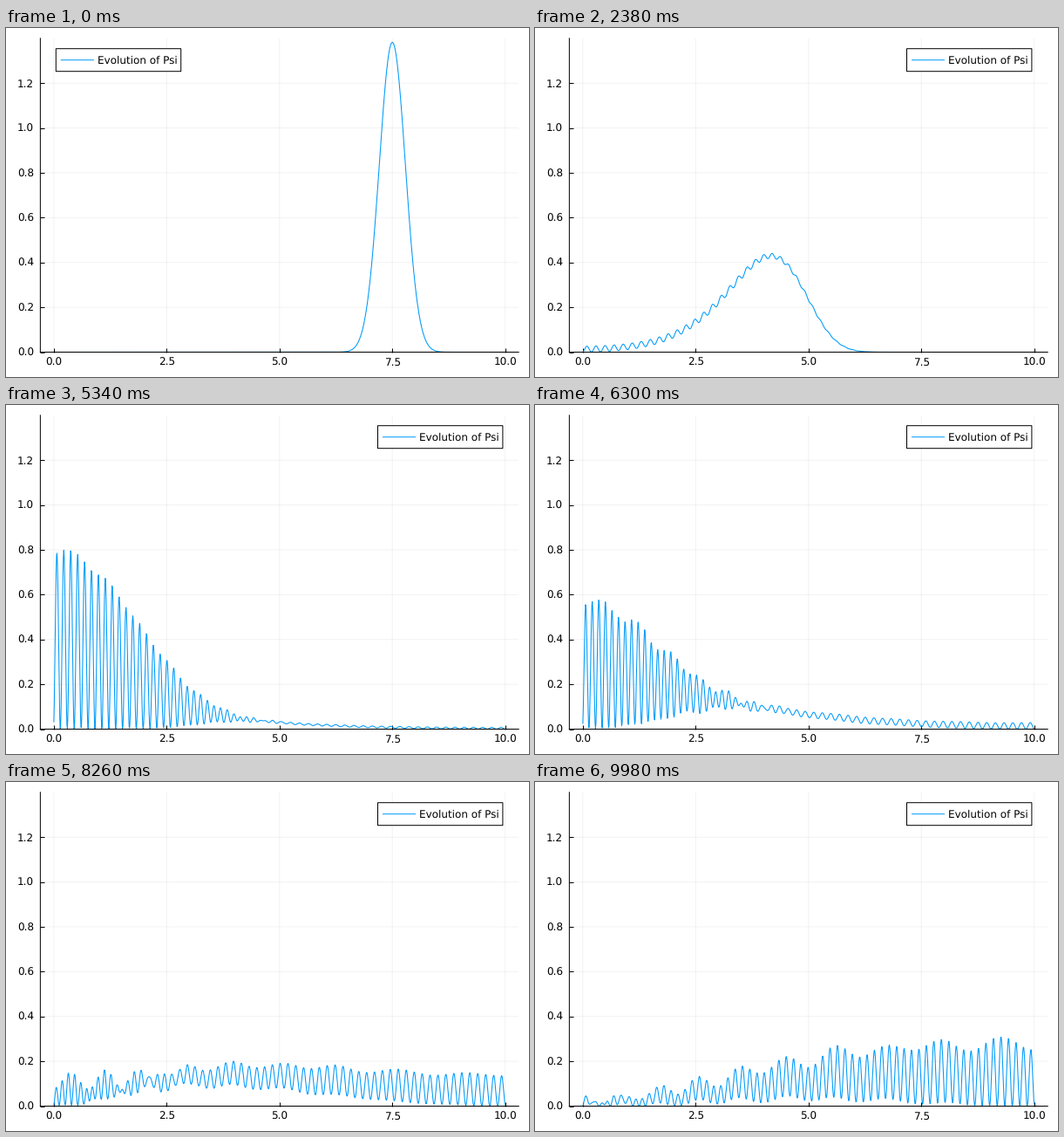
Write a matplotlib script that moves like this. It is 600 px wide and 400 px high and loops after 10 s.

```python
import matplotlib.pyplot as plt
import numpy as np
from matplotlib.animation import FuncAnimation
from matplotlib.patches import Rectangle

W, H, DPI = 600, 400, 100
FRAMES, INTERVAL = 500, 20
PX = 72 / DPI  # one pixel in points
BLUE = "#009afa"
LEFT, RIGHT, TOP, BOTTOM = 39.37, 588.19, 11.81, 371.5
LEGEND_SWITCH = 20  # frame at which the legend jumps to the right
LEGEND_LEFT, LEGEND_SHIFT = 57.3, 369.2

# Wave packet between two hard walls, stepped with Crank-Nicolson
DX, DT, STEPS = 0.01, 1 / 3, 5
X0, K0 = 7.5, 20.0
N = 1001
MODES = 150


def densities():
    """|psi|^2 for every frame, from the sine modes of the grid."""
    x = DX * np.arange(N)
    psi = (6 / np.pi) ** 0.25 * np.exp(-3 * (x - X0) ** 2 - 1j * K0 * x)
    theta = np.pi * np.arange(1, MODES + 1) / (N + 1)
    modes = np.sin(np.outer(theta, np.arange(1, N + 1)))
    coeffs = modes @ psi * 2 / (N + 1)
    energy = (1 - np.cos(theta)) / DX**2
    phase = 2 * STEPS * np.arctan(energy * DT / 2)
    waves = np.exp(-1j * np.outer(np.arange(FRAMES), phase)) * coeffs
    return x, np.abs(waves @ modes) ** 2


def make_plot(fig):
    ax = fig.add_axes([LEFT / W, 1 - BOTTOM / H, (RIGHT - LEFT) / W, (BOTTOM - TOP) / H])
    ax.set_xlim(-0.3, 10.3)
    ax.set_ylim(0, 1.4)
    ax.set_xticks([0, 2.5, 5, 7.5, 10], ["0.0", "2.5", "5.0", "7.5", "10.0"])
    ticks = np.arange(7) * 0.2
    ax.set_yticks(ticks, [f"{t:.1f}" for t in ticks])
    ax.tick_params(direction="in", length=5 * PX, width=PX, labelsize=12 * PX)
    ax.tick_params(axis="x", pad=6.2 * PX)
    ax.tick_params(axis="y", pad=7.4 * PX)
    ax.grid(color="black", alpha=0.05, linewidth=PX)
    ax.set_axisbelow(True)
    ax.spines[["top", "right"]].set_visible(False)
    ax.spines[["left", "bottom"]].set_linewidth(PX)
    return ax


def make_legend(fig):
    layer = fig.add_axes([0, 0, 1, 1])
    layer.set_xlim(0, W)
    layer.set_ylim(H, 0)
    layer.axis("off")
    box = Rectangle((0, 23.7), 143.4, 26, facecolor="white", edgecolor="black", linewidth=PX)
    layer.add_patch(box)
    sample, = layer.plot([0, 0], [36.7, 36.7], color=BLUE, linewidth=PX)
    label = layer.text(0, 41.2, "Evolution of Psi", fontsize=12 * PX, va="baseline")
    return box, sample, label


plt.rcParams.update({
    "font.family": "DejaVu Sans",
    "text.hinting": "none",
    "path.snap": False,
})
fig = plt.figure(figsize=(W / DPI, H / DPI), dpi=DPI, facecolor="white")
x, density = densities()
ax = make_plot(fig)
curve, = ax.plot(x, density[0], color=BLUE, linewidth=1.05 * PX)
box, sample, label = make_legend(fig)


def update(i):
    curve.set_ydata(density[i])
    left = LEGEND_LEFT + (LEGEND_SHIFT if i >= LEGEND_SWITCH else 0)
    box.set_x(left)
    sample.set_xdata([left + 6, left + 43])
    label.set_x(left + 47.5)
    return curve, box, sample, label


anim = FuncAnimation(fig, update, frames=FRAMES, interval=INTERVAL, repeat=True, repeat_delay=0)
plt.show()
```
